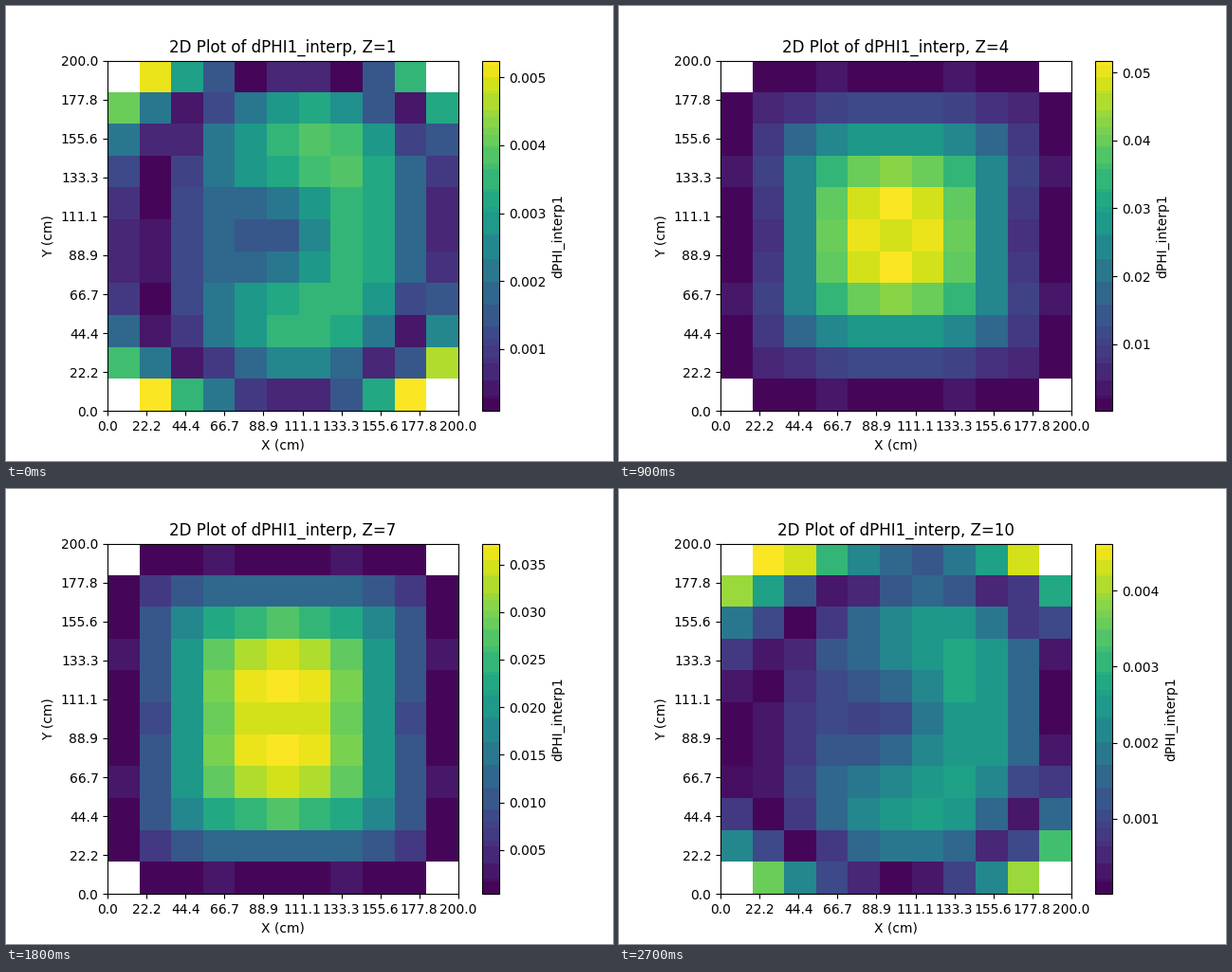
These frames come from a looping animation (640 by 480 pixels, 3000 ms). A matplotlib script:

```python
import numpy as np
import matplotlib.pyplot as plt
from matplotlib.animation import FuncAnimation
from matplotlib.colors import ListedColormap

SIZE = 200.0
CELLS = 11

axis = np.linspace(-1, 1, CELLS)
x, y = np.meshgrid(axis, axis[::-1])
ax_x, ax_y = np.abs(x), np.abs(y)
radius2 = x**2 + y**2


def dome(nx, px, ny, py, widen=0, core=0, rim=0, corner=0, lean=0):
    """Peaked flux in the middle layers; rows get broader away from the centre."""
    field = (1 - ax_x**nx) ** (px - widen * ax_y) * (1 - ax_y**ny) ** py
    field += core * np.exp(-60 * radius2)
    inner, outer = np.minimum(ax_x, ax_y), np.maximum(ax_x, ax_y)
    field += rim * np.sin(1.25 * np.pi * inner) ** 2 * (outer == 1)
    # Near the corners the flux changes sign, leaving a dark ring.
    return field + corner * (0.1 - (ax_x * ax_y) ** 2.5) + lean * (x + y)


def shell(height, fall_x, cross, dip, twist, lift):
    """Weak flux of the end layers: a dented bump inside a strong rim."""
    field = height - fall_x * x**2 - 0.75 * ax_y**5 - cross * (x * y) ** 2
    field -= dip * np.exp(-8 * radius2)
    field += 0.5 * x * (1 - x**2) * (1 - 0.5 * y**2)
    return np.clip(field + twist * x * y + lift * y**3, -1, 1)


def scale(field, low, high):
    """Scale the magnitude to its value range and blank the four corners."""
    field = np.abs(field)
    field = low + (high - low) * field / field[~(ax_x * ax_y == 1)].max()
    field[ax_x * ax_y == 1] = np.nan
    return field


def banded_viridis():
    """Viridis with neighbouring shades merged into flat bands."""
    table = (plt.get_cmap("viridis")(np.arange(256))[:, :3] * 255).astype(int)
    keys = table // (32, 16, 32)
    return ListedColormap([table[(keys == k).all(axis=1)].mean(axis=0) / 255
                           for k in keys])


peak = dome(1.5, 2.1, 1.5, 1.5, widen=1.7)

# One entry per layer: flux shape, lowest and highest value.
LAYERS = [
    (shell(0.75, 0.85, 0.6, 0.5, 0.1, 0.1), 9e-5, 0.005245),
    (dome(2, 1.1, 3, 1, corner=0.3, lean=0.025), 7.4e-5, 0.01411),
    (dome(2, 1.5, 2.5, 1.2, widen=0.7, rim=0.04), 0.0002, 0.0268),
    (dome(2, 1.95, 2, 1.55, widen=1.3, core=-0.13, rim=0.04), 0.00018, 0.05173),
    (peak, 0.0007, 0.078),
    (peak, 0.00073, 0.07654),
    (dome(2, 1.55, 3, 1.5, widen=1, core=-0.1, rim=0.06), 0.0004, 0.03718),
    (dome(2, 1.3, 3, 1.25, widen=0.5, rim=0.05), 0.0002, 0.0203),
    (dome(2, 1, 3, 1, core=0.1, corner=0.3, lean=0.015), 2e-5, 0.01126),
    (shell(0.58, 0.58, 0.65, 0.35, 0.15, -0.15), 1e-5, 0.004616),
]

cmap = banded_viridis()
ticks = np.linspace(0, SIZE, 10)
labels = [f"{t:.1f}" for t in ticks]
fig = plt.figure(figsize=(6.4, 4.8), dpi=100)


def draw(i):
    fig.clear()
    ax = fig.add_subplot()
    field, low, high = LAYERS[i]
    image = ax.imshow(scale(field, low, high), cmap=cmap, vmin=low, vmax=high,
                      extent=(0, SIZE, 0, SIZE), interpolation="nearest")
    fig.colorbar(image, ax=ax, label="dPHI_interp1")
    ax.set_xticks(ticks, labels)
    ax.set_yticks(ticks, labels)
    ax.set_xlabel("X (cm)")
    ax.set_ylabel("Y (cm)")
    ax.set_title(f"2D Plot of dPHI1_interp, Z={i + 1}", pad=6.6)
    return []


anim = FuncAnimation(fig, draw, frames=len(LAYERS), interval=300,
                     init_func=lambda: [], repeat=True, repeat_delay=0)
plt.show()
```
